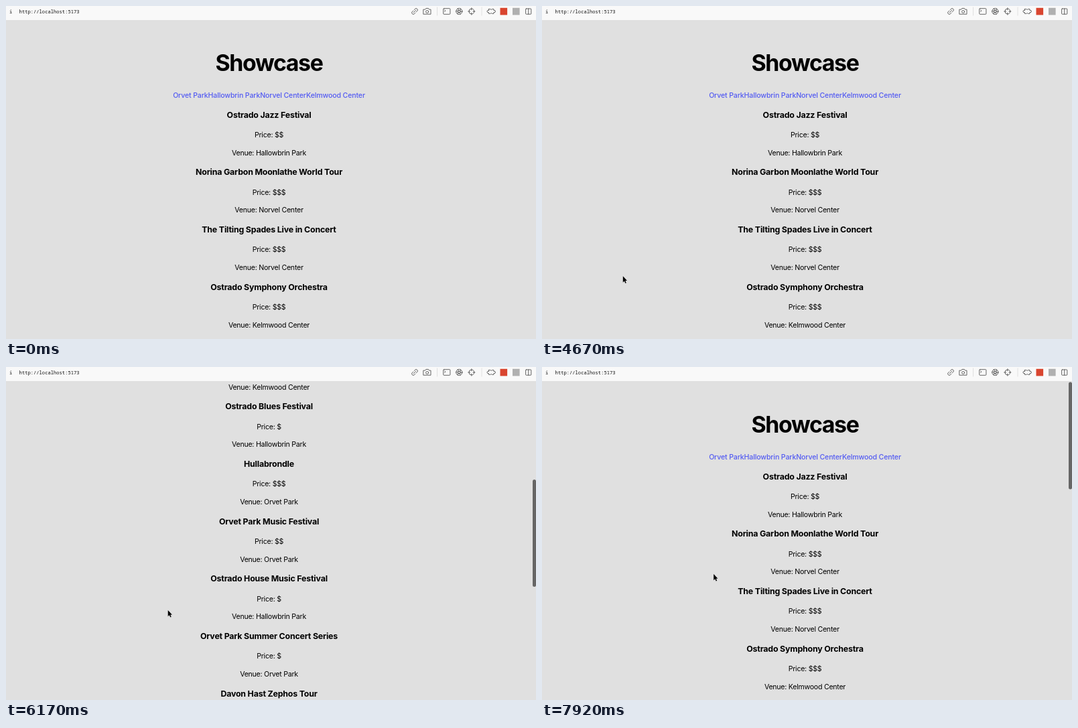
An HTML page that plays this animation: 791x497 px, repeating every 8000 ms.

```html
<!DOCTYPE html>
<html lang="en">
<head>
<meta charset="utf-8">
<title>Showcase</title>
<style>
html, body { margin: 0; width: 100%; height: 100%; overflow: hidden; background: #e0e0e0; }
#view { position: absolute; inset: 21px 0 0; overflow: hidden; }
#page { position: absolute; top: -21px; left: 0; width: 785px; }
#page div {
  position: absolute; width: 100%; text-align: center; white-space: nowrap;
  font: 400 10.58px/0 Inter, sans-serif; font-optical-sizing: none; letter-spacing: -.023em; color: #000;
}
#page .title { font-size: 33.8px; font-weight: 700; letter-spacing: -.039em; }
#page .links { font-weight: 500; letter-spacing: -.013em; color: #535bf2; }
#page .show { font-size: 12.38px; font-weight: 700; letter-spacing: -.015em; }
#thumb { position: absolute; left: 786px; top: 0; width: 5px; height: 160px; border-radius: 2.5px; background: #666; }
svg { position: absolute; left: 0; top: 0; overflow: visible; }
#bar { background: #f9f9f9; }
#bar text { font: 7.15px "Noto Sans Mono", monospace; fill: #111; }
#cursor { filter: drop-shadow(0 .6px .5px rgba(0,0,0,.35)); }
</style>
</head>
<body>
<div id="view"><div id="page"></div></div>
<svg id="bar" width="791" height="21" fill="none" stroke="#555" stroke-width=".9" stroke-linejoin="round" stroke-linecap="round">
  <g stroke="none">
    <text x="5" y="10.7" font-weight="700">i</text>
    <text x="19.6" y="10.7">http://localhost:5173</text>
    <rect x="737.5" y="2.8" width="10.6" height="10.6" fill="#d9452f"/>
    <rect x="756" y="2.8" width="10.6" height="10.6" fill="#b0b0b0"/>
  </g>
  <path d="M643.5 2v12M710 2v12" stroke="#ddd"/>
  <g transform="rotate(-45 610 8)">
    <path d="M609 5.8h-2a2.2 2.2 0 0 0 0 4.4h2M611 5.8h2a2.2 2.2 0 0 1 0 4.4h-2M607.8 8h4.4"/>
  </g>
  <path d="M623.2 5.2h2.5l1.1-1.7h3.6l1.1 1.7h2.5v7h-10.8z"/>
  <circle cx="628.6" cy="8.5" r="2"/>
  <rect x="652.7" y="3.7" width="10.2" height="8.6" rx="1"/>
  <path d="M654.6 6l1.4 1.2-1.4 1.2"/>
  <circle cx="676.3" cy="8" r="4.6"/>
  <path id="blades"/>
  <circle cx="694.8" cy="8" r="3.9"/>
  <path d="M694.8 2.8v3M694.8 10.2v3M689.6 8h3M697 8h3"/>
  <path d="M720.5 4.6h2.2q1.5 1.6 3 0h2.2v1.8q2.6-.4 2.6 1.6t-2.6 1.6v1.8h-2.2q-1.5-1.6-3 0h-2.2v-1.8q-2.6.4-2.6-1.6t2.6-1.6z"/>
  <rect x="775.6" y="4" width="8.2" height="8.2" rx=".8"/>
  <path d="M779.7 4v8.2"/>
</svg>
<div id="thumb"></div>
<svg id="cursor" width="8" height="12">
  <path d="M0 0V9.2L2.1 7.3 3.5 10.5 5 9.9 3.6 6.8H6.2Z" stroke="#fff" stroke-width=".9" paint-order="stroke"/>
</svg>
<script>
const $ = id => document.getElementById(id);
const page = $('page'), thumb = $('thumb'), cursor = $('cursor');

const venues = ['Orvet Park', 'Hallowbrin Park', 'Norvel Center', 'Kelmwood Center'];
// name, price level, venue index
const shows = [
  ['Ostrado Jazz Festival', 2, 1],
  ['Norina Garbon Moonlathe World Tour', 3, 2],
  ['The Tilting Spades Live in Concert', 3, 2],
  ['Ostrado Symphony Orchestra', 3, 3],
  ['Ostrado Blues Festival', 1, 1],
  ['Hullabrondle', 3, 0],
  ['Orvet Park Music Festival', 2, 0],
  ['Ostrado House Music Festival', 1, 1],
  ['Orvet Park Summer Concert Series', 1, 0],
  ['Davon Hast Zephos Tour', 3, 2]
];

function line(text, y, kind = '') {
  const el = document.createElement('div');
  el.textContent = text;
  el.className = kind;
  el.style.top = y + 'px';
  page.append(el);
}

line('Showcase', 84.7, 'title');
line(venues.join(''), 133.8, 'links');
shows.forEach(([name, price, venue], i) => {
  const y = 162.7 + 85.67 * i;
  line(name, y, 'show');
  line('Price: ' + '$'.repeat(price), y + 30.3);
  line('Venue: ' + venues[venue], y + 56.8);
});

// aperture blades: six chords inside the ring
let d = '';
for (let k = 0; k < 6; k++) {
  const a = k * Math.PI / 3, b = a + 1.9;
  d += `M${676.3 + 4.6 * Math.cos(a)} ${8 + 4.6 * Math.sin(a)}L${676.3 + 2 * Math.cos(b)} ${8 + 2 * Math.sin(b)}`;
}
$('blades').setAttribute('d', d);

// Smooth curve through [tick, value] points, without overshoot
function curve(pts) {
  const slope = i => pts[i + 1] && pts[i] ? (pts[i + 1][1] - pts[i][1]) / (pts[i + 1][0] - pts[i][0]) : 0;
  const tangent = i => {
    const a = slope(i - 1), b = slope(i);
    return a * b > 0 ? 2 * a * b / (a + b) : 0;
  };
  return t => {
    const last = pts.length - 1;
    if (t <= pts[0][0]) return pts[0][1];
    if (t >= pts[last][0]) return pts[last][1];
    const i = pts.findIndex(p => p[0] > t) - 1;
    const [t0, v0] = pts[i], [t1, v1] = pts[i + 1];
    const h = t1 - t0, u = (t - t0) / h, w = 1 - u;
    return v0 * w * w * (1 + 2 * u) + v1 * u * u * (3 - 2 * u)
      + h * u * w * (tangent(i) * w - tangent(i + 1) * u);
  };
}

const scrollAt = curve([[64, 0], [67, 100], [69, 215], [72, 375], [74, 446], [78, 505],
  [81, 481.5], [84, 340], [88, 109], [91, 22], [95, -.5]]);
const xAt = curve([[52, 46], [58, 147], [59, 147], [64, 242.7], [67, 242.7], [69, 241.7], [90, 241.7], [95, 256.2]]);
const yAt = curve([[52, 427], [58, 395], [59, 395], [64, 363], [90, 363], [95, 309]]);

function draw() {
  // 12 ticks a second, 96 ticks a loop
  const tick = Math.floor((performance.now() + 4) * .012) % 96;
  const scroll = scrollAt(tick);
  page.style.transform = `translateY(${-scroll}px)`;
  thumb.style.transform = `translateY(${22.6 + .326 * Math.max(0, scroll)}px)`;
  thumb.style.visibility = tick > 64 ? 'visible' : 'hidden';
  cursor.style.transform = `translate(${xAt(tick)}px, ${yAt(tick)}px)`;
  cursor.style.visibility = tick >= 52 ? 'visible' : 'hidden';
  requestAnimationFrame(draw);
}
draw();
</script>
</body>
</html>
```
